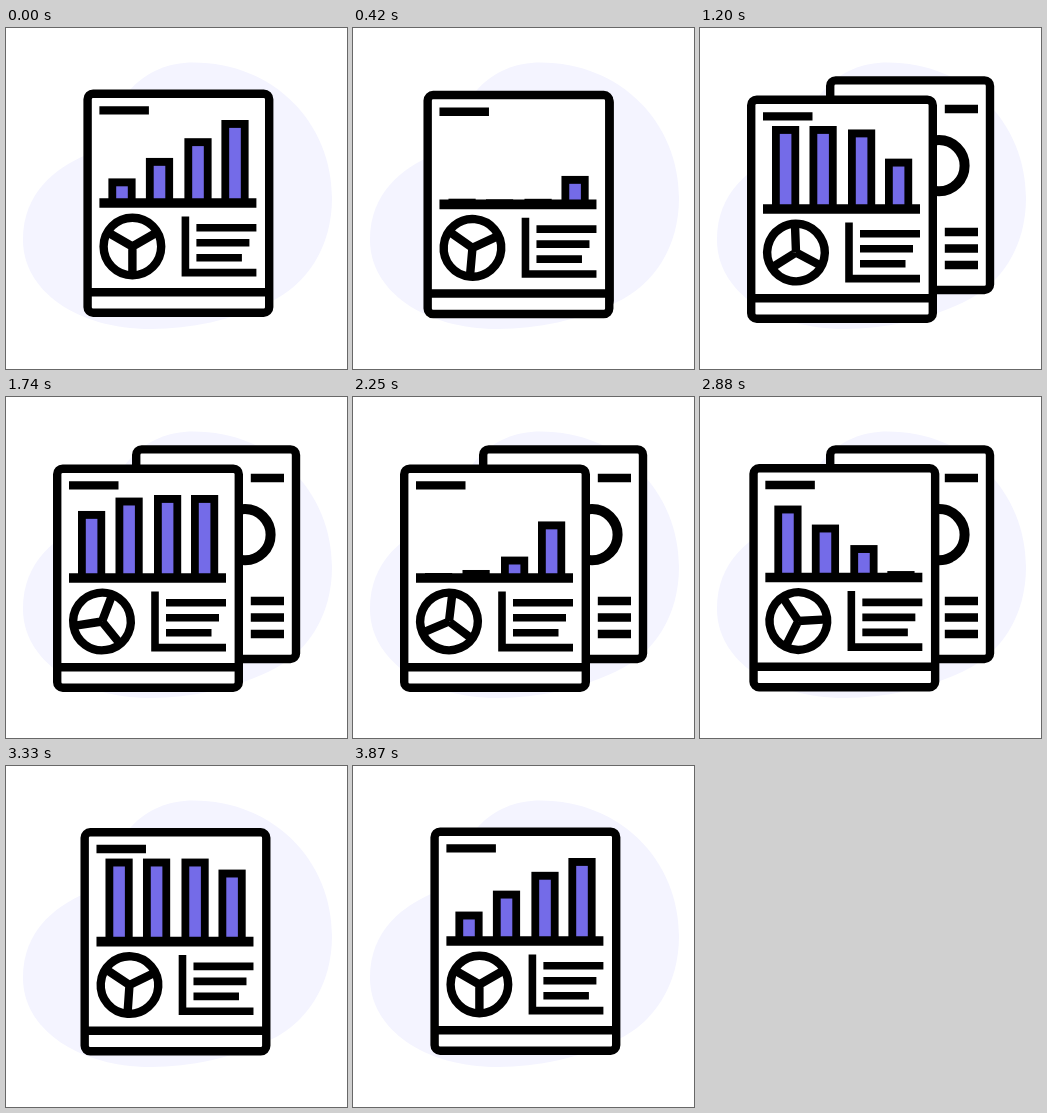
An HTML page that plays this animation: 341x341 px, repeating every 3900 ms.

```html
<!DOCTYPE html>
<html lang="en">
<head>
<meta charset="utf-8">
<title>Report pages</title>
<style>
  html, body { margin: 0; width: 100%; height: 100%; overflow: hidden; background: #fff; }
  svg { display: block; width: 100vw; height: 100vh; }
  .line { fill: none; stroke: #000; stroke-width: 8.4; }
  .thin { stroke-width: 7.6; }
  .sheet { fill: #fff; stroke: #000; stroke-width: 8.4; }
</style>
</head>
<body>
<svg viewBox="0 0 341 341">
  <path fill="#f4f4ff" d="M124 62C141 43 163 34.5 187 34.5C268 34.5 326 95 326 170C326 218 302 257 262 275C225 292 185 301 145 301C70 301 17 262 17 212C17 164 50 140 80 127C105 115 106 80 124 62Z"/>
  <g id="back">
    <rect class="sheet" x="130.2" y="52.4" width="159.8" height="209.6" rx="5.5"/>
    <path class="line" d="M244.8 81H278M244.8 204H278M244.8 220.5H278M244.8 237H278"/>
    <circle class="line" cx="239" cy="137.7" r="25.6" style="stroke-width:10"/>
  </g>
  <g id="front">
    <rect class="sheet" x="81.2" y="65.7" width="181.6" height="219" rx="5.5"/>
    <path class="line" d="M81 264.2H263M93 82.4H142.5"/>
    <g id="bars"></g>
    <path class="line" style="stroke-width:9.6" d="M93 175H250"/>
    <g id="pie">
      <circle class="line" cx="126" cy="218.5" r="28.8"/>
      <path class="line" d="M126 218.5V247M126 218.5L101.3 204.25M126 218.5L150.7 204.25"/>
    </g>
    <path class="line thin" d="M179 188.5V244.6H250M190 199.8H250M190 214.8H243M190 229.8H235.5"/>
  </g>
</svg>
<script>
const FRAME_MS = 30, FRAMES = 130;
const TOP = 92, BASE = 170, BAR_TIME = 22, SECOND_CYCLE = 66.4;
const byId = id => document.getElementById(id);

const barSpecs = [
  { x: 102,   fall: -14.8, rise: 12.8 },
  { x: 139.5, fall: -10.8, rise: 16.9 },
  { x: 178,   fall: -6.9,  rise: 20.8 },
  { x: 215,   fall: 0,     rise: 27.8 }
];

function addRect(x, width, fill) {
  const rect = document.createElementNS('http://www.w3.org/2000/svg', 'rect');
  rect.setAttribute('x', x);
  rect.setAttribute('width', width);
  rect.setAttribute('fill', fill);
  byId('bars').append(rect);
  return rect;
}

const bars = barSpecs.map(spec => ({
  ...spec,
  frame: addRect(spec.x, 27.2, '#000'),
  fill: addRect(spec.x + 7.8, 11.6, '#746be8')
}));

function ease(t, from, to) {
  const s = Math.min(1, Math.max(0, (t - from) / (to - from)));
  return s * s * (3 - 2 * s);
}

function span(rect, top, bottom) {
  rect.setAttribute('y', top);
  rect.setAttribute('height', Math.max(0, bottom - top));
}

// Each bar falls and rises twice per loop; the last fall wraps around the end.
function barTop(bar, t) {
  const starts = [0, SECOND_CYCLE, FRAMES];
  const step = (start, shift) => ease(t, start + shift, start + shift + BAR_TIME);
  const drop = starts.reduce(
    (sum, shift) => sum + step(bar.fall, shift) - step(bar.rise, shift), 0);
  return TOP + (BASE - TOP) * drop;
}

function move(id, x, y) {
  byId(id).setAttribute('transform', `translate(${x} ${y})`);
}

function draw(t) {
  const slide = ease(t, 6.2, 31.4) - ease(t, 92, 115.5);
  const reveal = ease(t, 12.3, 25.5) - ease(t, 97.2, 110.4);
  const spin = 81 * (ease(t, 6, 58.5) - ease(t, 59, 119));

  move('front', 0.4 - 30.4 * slide, 6 * slide);
  move('back', -35 * (1 - reveal), 17 * (1 - reveal));
  byId('pie').setAttribute('transform', `rotate(${spin} 126 218.5)`);

  for (const bar of bars) {
    const top = barTop(bar, t);
    span(bar.frame, top, 175);
    span(bar.fill, top + 7.9, 175);
  }
}

const start = performance.now();
function tick() {
  draw(Math.floor((performance.now() - start) / FRAME_MS) % FRAMES);
  requestAnimationFrame(tick);
}
tick();
</script>
</body>
</html>
```
